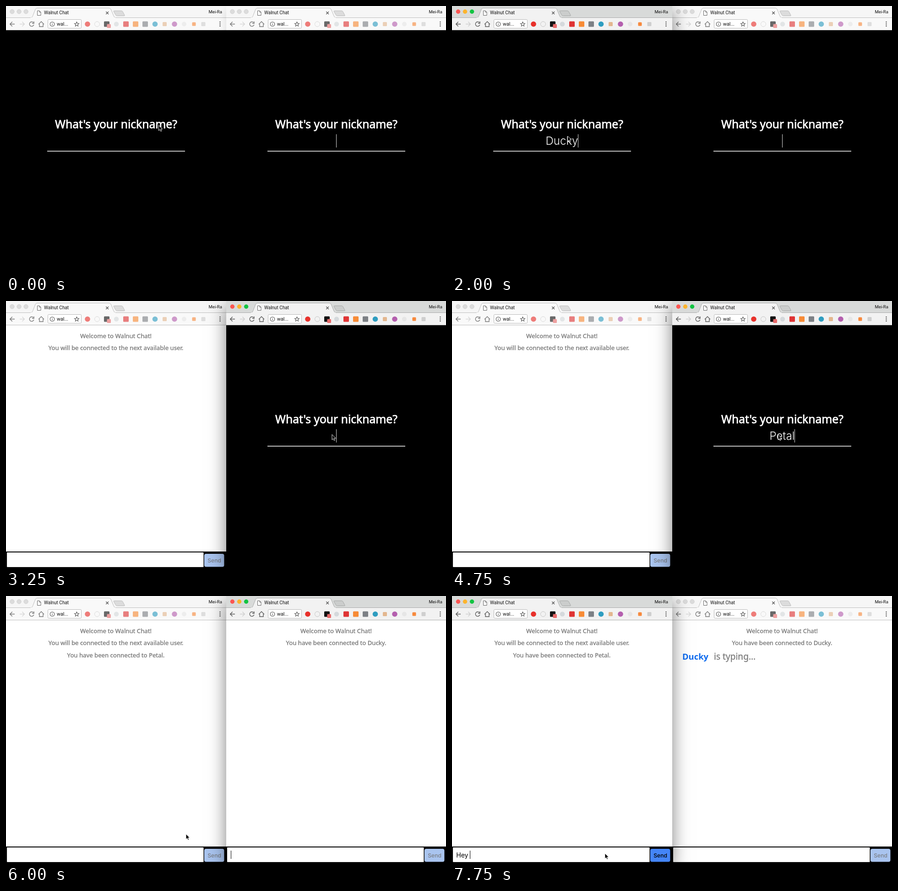
An HTML page that plays this animation: 961x583 px, repeating every 8000 ms.

```html
<!DOCTYPE html>
<html lang="en">
<head>
<meta charset="utf-8">
<title>Walnut Chat</title>
<style>
html, body { margin: 0; width: 100%; height: 100%; overflow: hidden; background: #000; }
#stage { position: relative; width: 961px; height: 583px; overflow: hidden; }
.win { position: absolute; top: 0; left: 0; width: 481px; height: 583px; z-index: 1; }
.win + .win { left: 481px; width: 480px; }
.win.front { z-index: 2; box-shadow: 0 8px 18px rgba(0, 0, 0, .12); }
.win.active { box-shadow: 0 12px 36px rgba(0, 0, 0, .5); }
svg { display: block; position: absolute; top: 0; left: 0; overflow: hidden; }
text { white-space: pre; }
.ui { font: 10px Roboto, sans-serif; fill: #111; }
.strip { fill: #f6f6f6; }
.tab, .toolbar { fill: #f9f9f9; }
.tab, .edge { stroke: #bdbdbd; }
.plus { fill: #dcdcdc; stroke: #bcbcbc; }
.light { fill: #dcdcdc; stroke: #cacaca; stroke-width: .7; }
.nav { fill: none; stroke: #5a5a5a; stroke-width: 1.4; opacity: .8; }
.ext { opacity: .62; }
.active .strip { fill: #d8dad9; }
.active .tab, .active .toolbar { fill: #f2f2f2; }
.active .tab, .active .edge { stroke: #a9abaa; }
.active .plus { fill: #cbcdcc; stroke: #a6a8a7; }
.active .light { fill: var(--on); stroke: none; }
.active .nav, .active .ext { opacity: 1; }
.ask { font: 24.65px "Noto Sans", sans-serif; fill: #fff; stroke: #fff; stroke-width: .75; }
.nick { font: 300 24px Inter, sans-serif; fill: #fff; }
.msg { font: 13.2px "Noto Sans", sans-serif; fill: #757575; stroke: #757575; stroke-width: .3; }
.typing { font: 19.1px "Noto Sans", sans-serif; fill: #7b7b7b; stroke: #7b7b7b; stroke-width: .3; }
.who { font-weight: 700; font-size: 18.4px; fill: #0b69ee; stroke: none; }
.send { fill: #a9c4ef; }
.sendText { font: 500 12.2px Inter, sans-serif; fill: #7b7f86; }
.ready .send { fill: #4485f7; }
.ready .sendText { fill: #000; }
.draft { font: 14px Inter, sans-serif; fill: #000; }
.mid { text-anchor: middle; }
#cursor { z-index: 3; overflow: visible; }
</style>
</head>
<body>
<div id="stage">
  <div class="win"></div>
  <div class="win"></div>
  <svg id="cursor" width="10" height="15">
    <path d="M0 0V11.6L2.7 9.1 4.5 13.2 6.5 12.3 4.7 8.3H8.3Z" fill="#000" stroke="#fff" stroke-width=".9"/>
  </svg>
</div>
<script>
const LOOP = 8000, STEP = 250;
const APP = 'Walnut Chat', NAMES = ['Ducky', 'Petal'];

const disc = (x, color, r = 5.8) => `<circle cx="${x}" cy="39.5" r="${r}" fill="${color}"/>`;
const tile = (x, color, s = 12) =>
  `<rect x="${x - s / 2}" y="${39.5 - s / 2}" width="${s}" height="${s}" rx="1.5" fill="${color}"/>`;
const lights = ['#fb5652', '#fdb42c', '#12c441'].map((color, i) =>
  `<circle class="light" style="--on:${color}" cx="${13.4 + 15.1 * i}" cy="12.3" r="4.7"/>`).join('');
const dots = [35, 39.3, 43.6].map(y => `<circle cx="467.5" cy="${y}" r="1.3" fill="#5a5a5a"/>`).join('');

const star = Array.from({ length: 10 }, (_, i) => {
  const a = i * Math.PI / 5 - Math.PI / 2, r = i % 2 ? 2.3 : 5.2;
  return `${154.5 + r * Math.cos(a)},${39.8 + r * Math.sin(a)}`;
}).join(' ');

const chrome = `
  <rect class="strip" width="481" height="53"/>
  <rect class="toolbar" y="25" width="481" height="28"/>
  <path class="edge" d="M0 25.5H481M0 52.5H481"/>
  <path class="tab" d="M54 25.5C57 25 57.5 24 58.5 21.5L64 7.5Q65.3 4.5 68 4.5H225Q228 4.5 229.3 7.5L235 21.5Q236.4 25 239 25.5"/>
  <path class="toolbar" d="M54 25H239V27H54Z"/>
  <path class="plus" d="M236.5 10.5H252Q254 10.5 255 12.5L259 20Q259.6 21.5 258 21.5H242.5Q240.5 21.5 239.5 19.5L235.3 12Q234.6 10.5 236.5 10.5Z"/>
  ${lights}
  <path d="M68.5 10.5H73L76 13.5V20.5H68.5ZM73 10.5V13.5H76" fill="#fff" stroke="#666"/>
  <text class="ui" x="83" y="18.4">${APP}</text>
  <path d="M218.3 12.3L224 18M224 12.3L218.3 18" stroke="#555" stroke-width="1.3"/>
  <text class="ui" x="472" y="16" text-anchor="end" style="font-size:9.6px">Mei-Ra</text>
  <g class="nav">
    <path d="M19 39.5H9M13.7 34.5L8.7 39.5L13.7 44.5"/>
    <path d="M30 39.5H40M35.3 34.5L40.3 39.5L35.3 44.5" stroke="#cfcfcf"/>
    <path d="M59.8 36.2A4.9 4.9 0 1 0 60.8 41M61 33.8V38H56.8"/>
    <path d="M71 40L77 34L83 40M73 39V45H81V39"/>
  </g>
  <rect x="91.5" y="29.5" width="73" height="19" rx="2" fill="#fff" stroke="#b9b9b9"/>
  <g fill="none" stroke="#555" stroke-width="1.1">
    <circle cx="101" cy="39.5" r="4.8"/><path d="M101 38.7V42M101 36.6V37.8"/>
    <polygon points="${star}"/>
  </g>
  <text class="ui" x="111" y="43.2" style="font-size:10.7px">wal...</text>
  <g class="ext">
    ${disc(178, '#e8312b')}
    <circle cx="199" cy="39.5" r="5.5" fill="none" stroke="#c4c4c4"/>
    ${tile(220, '#111')}
    <rect x="220.5" y="39.5" width="8.5" height="8.5" rx="1.5" fill="#e86a6a"/>
    ${disc(241, '#d5d9dc', 5.2)}${tile(262, '#df3434')}${tile(283, '#f78b36')}
    ${tile(304, '#7c8085')}${disc(325.5, '#2f9dc0')}${tile(346.5, '#e3b78f', 9)}
    ${disc(368, '#b45fae')}${disc(389, '#e6e6e6', 5)}${tile(410.5, '#f7893c', 8)}${tile(431, '#cfcfcf', 9)}
  </g>
  ${dots}`;

const page = `
  <g data-k="login">
    <rect y="53" width="481" height="530"/>
    <text class="ask mid" x="240.5" y="267">What's your nickname?</text>
    <text class="nick mid" x="240" y="303.3" data-k="nick"></text>
    <rect y="280" width="1" height="29" fill="#ddd" data-k="nickCaret"/>
    <rect x="90" y="316.2" width="301" height="1.5" fill="#fff"/>
  </g>
  <g data-k="chat">
    <rect y="53" width="481" height="530" fill="#fff"/>
    ${[80.7, 107.1, 133.5].map((y, i) => `<text class="msg mid" x="240" y="${y}" data-k="msg${i}"></text>`).join('')}
    <g class="typing" data-k="typing">
      <text class="who" x="22" y="139">${NAMES[0]}</text><text x="91" y="139">is typing...</text>
    </g>
    <rect y="547" width="481" height="36"/>
    <rect x="2" y="549" width="429.5" height="32" rx="1" fill="#fff"/>
    <g data-k="button">
      <rect class="send" x="433" y="552" width="43.5" height="28.5" rx="4"/>
      <text class="sendText mid" x="455.2" y="571">Send</text>
    </g>
    <text class="draft" x="9.3" y="571" data-k="draft"></text>
    <rect y="556" width="1" height="18" data-k="draftCaret"/>
  </g>`;

const wins = [...document.querySelectorAll('.win')].map(el => {
  el.innerHTML = `<svg width="481" height="583">${page}${chrome}</svg>`;
  const parts = { el };
  el.querySelectorAll('[data-k]').forEach(p => parts[p.dataset.k] = p);
  return parts;
});
const cursor = document.getElementById('cursor');

const show = (el, on) => el.style.display = on ? '' : 'none';
const blink = since => Math.floor(since / 500) % 2 === 0;
const typed = (t, keys) => keys.reduce((text, [at, value]) => t >= at ? value : text, '');

const PATH = [[0, 333.5, 260.5], [1000, 252.5, 284], [2500, 252.5, 284],
              [3250, 712, 291.5], [5250, 712, 291.5], [6250, 334, 562], [LOOP, 334, 562]];

function pointer(t) {
  const i = PATH.findIndex(p => p[0] > t);
  const [t0, x0, y0] = PATH[i - 1], [t1, x1, y1] = PATH[i];
  const u = (t - t0) / (t1 - t0), e = u * u * (3 - 2 * u);
  return [x0 + (x1 - x0) * e, y0 + (y1 - y0) * e];
}

function paint(w, s) {
  w.el.classList.toggle('active', s.active);
  w.el.classList.toggle('front', s.front);
  show(w.login, !s.chat);
  show(w.chat, s.chat);
  w.nick.textContent = s.nick;
  show(w.nickCaret, s.caret);
  w.nickCaret.setAttribute('x', s.nick ? Math.round(240 + w.nick.getComputedTextLength() / 2) : 240);
  [0, 1, 2].forEach(i => w['msg' + i].textContent = s.messages[i] || '');
  show(w.typing, s.typing);
  w.draft.textContent = s.draft;
  w.button.classList.toggle('ready', s.draft !== '');
  show(w.draftCaret, s.caret);
  w.draftCaret.setAttribute('x', s.draft ? Math.round(9.3 + w.draft.getComputedTextLength()) : 10);
}

function render(t) {
  const leftActive = t >= 1000 && t < 3250 || t >= 6250;
  const rightActive = t >= 3250 && t < 6250;
  const welcome = `Welcome to ${APP}!`, joined = name => `You have been connected to ${name}.`;
  const upTo = list => list.filter(([at]) => t >= at).map(([, text]) => text);

  const leftCaret = t >= 7250 || t >= 6500 && blink(t - 6500)
    || t >= 2250 && t < 3250 && blink(t - 2250)
    || t >= 1000 && t < 2250 && (t >= 1500 || blink(t - 1000));
  const rightCaret = t < 3250 ? blink(t + 250)
    : t < 4250 ? blink(t - 3250)
    : t < 5000 || t < 6500 && blink(t - 5000);

  paint(wins[0], {
    active: leftActive, front: leftActive, chat: t >= 2250, caret: leftCaret,
    nick: typed(t, [[1500, 'D'], [1750, 'Duc'], [2000, NAMES[0]]]),
    messages: upTo([[2500, welcome],
      [2750, 'You will be connected to the next available user.'], [5000, joined(NAMES[1])]]),
    typing: false,
    draft: typed(t, [[7250, 'H'], [7500, 'Hey'], [7750, 'Hey ']])
  });
  paint(wins[1], {
    active: rightActive, front: !leftActive, chat: t >= 5000, caret: rightCaret,
    nick: typed(t, [[4250, 'P'], [4500, 'Pet'], [4750, NAMES[1]]]),
    messages: upTo([[5000, welcome], [5250, joined(NAMES[0])]]),
    typing: t >= 7250,
    draft: ''
  });
  const [x, y] = pointer(t);
  cursor.style.transform = `translate(${x}px, ${y}px)`;
}

const start = performance.now();
let last = -1;
function tick() {
  const t = Math.floor((performance.now() - start) % LOOP / STEP) * STEP;
  if (t !== last) render(last = t);
  requestAnimationFrame(tick);
}
tick();
</script>
</body>
</html>
```
